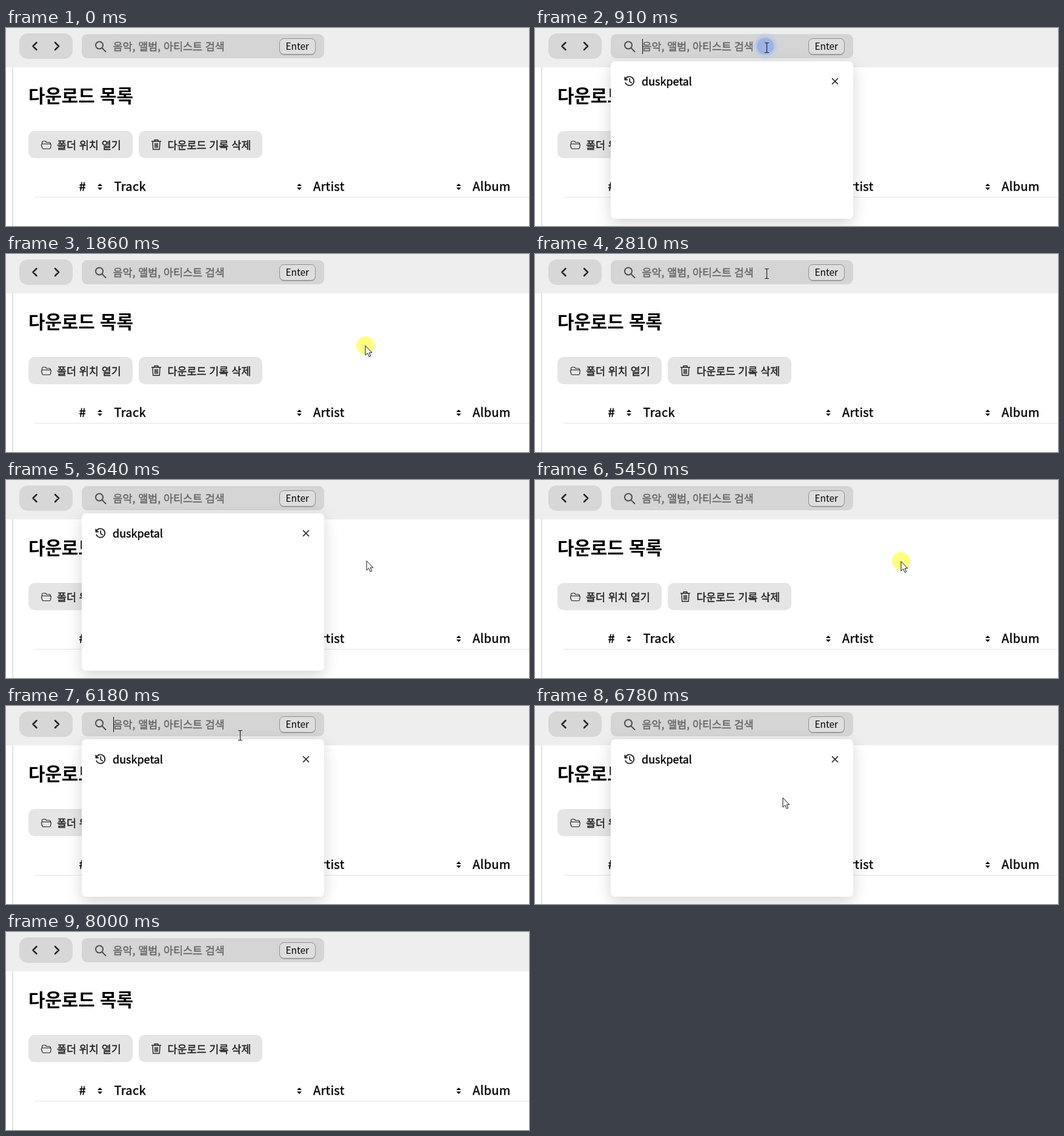
An HTML page that plays this animation: 863x327 px, repeating every 8060 ms.

```html
<!DOCTYPE html>
<html lang="ko">
<head>
<meta charset="utf-8">
<title>Search history panel</title>
<style>
html, body { margin: 0; width: 100%; height: 100%; overflow: hidden; background: #fff; }
svg { display: block; width: 863px; height: 327px; }
text { font: 17.4px "Noto Sans CJK KR", "Noto Sans CJK", "Noto Sans", sans-serif; fill: currentColor; white-space: pre; }
.mid { stroke: currentColor; stroke-width: .45px; }
.head { font-size: 20px; letter-spacing: .35px; }
.line { fill: none; stroke: #222; stroke-linecap: round; stroke-linejoin: round; }
#panel { filter: drop-shadow(0 8px 12px rgba(0, 0, 0, .16)); }
</style>
</head>
<body>
<svg viewBox="0 0 863 327">
  <defs>
    <radialGradient id="blue">
      <stop offset=".54" stop-color="#9db3e4"/>
      <stop offset=".6" stop-color="#b4c2e2" stop-opacity=".8"/>
      <stop offset="1" stop-color="#c8d2e8" stop-opacity="0"/>
    </radialGradient>
    <path id="sort" d="M-4 -1L0 -5L4 -1ZM-4 1.5L0 5.5L4 1.5Z"/>
  </defs>

  <rect width="863" height="65" fill="#eee"/>
  <rect x="10" y="65" width="2" height="262" fill="#e2e2e2"/>

  <rect x="22" y="9" width="88" height="42" rx="14" fill="#d7d7d7"/>
  <path class="line" d="M50.5 24L44.5 30L50.5 36M81 24L87 30L81 36" stroke-width="2.5"/>

  <rect x="125" y="10" width="400" height="40" rx="9" fill="#d5d5d5"/>
  <g class="line" style="stroke:#4c4c4c" stroke-width="2">
    <circle cx="154" cy="28.5" r="6"/>
    <path d="M158.5 33L164.5 39"/>
  </g>
  <text class="mid" x="176.5" y="37" color="#666">음악, 앨범, 아티스트 검색</text>
  <rect x="451.5" y="18.5" width="59" height="26.5" rx="7" fill="#aaa"/>
  <rect x="451.5" y="17.5" width="59" height="26" rx="7" fill="#dedede" stroke="#8f8f8f"/>
  <text x="461.5" y="36" style="font-size:15.4px">Enter</text>

  <text x="37" y="122.5" style="font-size:29.8px;font-weight:700">다운로드 목록</text>

  <g fill="#e5e5e5">
    <rect x="37" y="170" width="172" height="45" rx="10"/>
    <rect x="219" y="170" width="204" height="45" rx="10"/>
  </g>
  <path class="line" stroke-width="1.2" d="M59.5 191.5V189Q59.5 187 61.5 187H65L67 189H71.5Q73.5 189 73.5 191.5M60 191.5H72.5Q74.5 191.5 74.2 193.5L73.5 198Q73.2 199.5 71.5 199.5H61.5Q60 199.5 59.7 198L58.5 193.5Q58.3 191.5 60 191.5"/>
  <path class="line" stroke-width="1.4" d="M240.5 187.3H255.5M245 187V184.8H251V187M242 187.5L242.7 200.5H253.3L254 187.5M245.8 190.5V197.5M248 190.5V197.5M250.2 190.5V197.5"/>
  <g class="mid" color="#222">
    <text x="84" y="199.5">폴더 위치 열기</text>
    <text x="266.5" y="199.5">다운로드 기록 삭제</text>
  </g>

  <g class="mid">
    <text class="head" x="120.5" y="269">#</text>
    <text class="head" x="178.5" y="269">Track</text>
    <text class="head" x="507" y="269">Artist</text>
    <text class="head" x="770" y="269">Album</text>
  </g>
  <use href="#sort" x="155" y="262"/>
  <use href="#sort" x="484" y="262"/>
  <use href="#sort" x="747" y="262"/>
  <rect x="47" y="279" width="816" height="1" fill="#e3e3e3"/>

  <g id="panel">
    <rect x="125" y="55" width="400" height="260" rx="7" fill="#fff"/>
    <rect id="row" x="140" y="70" width="370" height="37" rx="6" fill="#f1f1f1"/>
    <path class="line" d="M149.3 84.5A7.3 7.3 0 1 1 149.2 90.5M148.3 81.5V85.5H152.3M156.2 84V88.5L159.2 90.5" stroke-width="1.8"/>
    <text class="mid" x="176" y="95" style="font-size:18px">duskpetal</text>
    <path class="line" d="M490.5 83.5L499.5 92.5M499.5 83.5L490.5 92.5" stroke-width="1.7"/>
  </g>
  <rect id="caret" x="177" y="18" width="1" height="25"/>

  <g id="mouse">
    <circle id="glow" r="24" fill="url(#blue)"/>
    <circle id="press" r="15" fill="#ffff80"/>
    <path id="beam" class="line" stroke-width="1.2" d="M-.5 -5.5H1.8L2.5 -5L3.2 -5.5H5.5M2.5 -5V10M-.5 10.5H1.8L2.5 10L3.2 10.5H5.5"/>
    <path id="arrow" d="M0 .5V16.2L3.6 12.8L6.2 18.6L8.7 17.5L6.2 11.9H10.9Z" fill="#fff" stroke="#111" stroke-linejoin="round"/>
  </g>
</svg>
<script>
const LOOP = 8060, BLINK = 530;
const search = [380, 30];

// Each round: click the search box, press inside the panel (which closes it), drag out.
const rounds = [
  { arrive: 780, click: 840, press: 1700, from: [450, 152], reach: 1860, to: [593, 151], release: 2000 },
  { arrive: 2440, click: 2930, rest: [595, 133], press: 4560, from: [483, 152], reach: 5450, to: [604, 134], release: 5630 },
  { arrive: 5880, click: 5930, press: 6890, from: [409, 151], reach: 7250, to: [657, 184], release: 7260 }
];
const stops = [
  [60, [653, 316]],
  ...rounds.flatMap(r => [
    [r.arrive, search], [r.click + 120, search],
    ...(r.rest ? [[r.click + 710, r.rest], [r.click + 1080, r.rest]] : []),
    [r.press - 110, r.from], [r.press, r.from],
    [r.reach, r.to], [r.release, r.to]
  ]),
  [7760, [802, 330]]
];

const el = id => document.getElementById(id);
const show = (id, on) => el(id).style.display = on ? "" : "none";
const within = (v, a, b) => v >= a && v < b;

function pointer(t) {
  const i = stops.findIndex(s => s[0] > t);
  if (i < 1) return null;
  const [t0, a] = stops[i - 1], [t1, b] = stops[i];
  const u = (t - t0) / (t1 - t0);
  const ease = (u + u * u * (3 - 2 * u)) / 2;
  return a.map((v, k) => Math.round(v + (b[k] - v) * ease));
}

function draw(now) {
  const t = now % LOOP;
  const open = rounds.find(r => within(t, r.click, r.press));
  show("panel", open);
  show("caret", open && (t - open.click) % (2 * BLINK) < BLINK);

  const p = pointer(t);
  show("mouse", p);
  if (p) {
    const [x, y] = p;
    const overInput = within(x, 125, 525) && within(y, 10, 50);
    el("mouse").setAttribute("transform", `translate(${x} ${y})`);
    show("beam", overInput);
    show("arrow", !overInput);
    show("row", within(x, 140, 510) && within(y, 70, 107));
    show("glow", rounds.some(r => within(t, r.click, r.click + 100)));
    show("press", rounds.some(r => within(t, r.press, r.release)));
  }
  requestAnimationFrame(draw);
}
draw(0);
</script>
</body>
</html>
```
